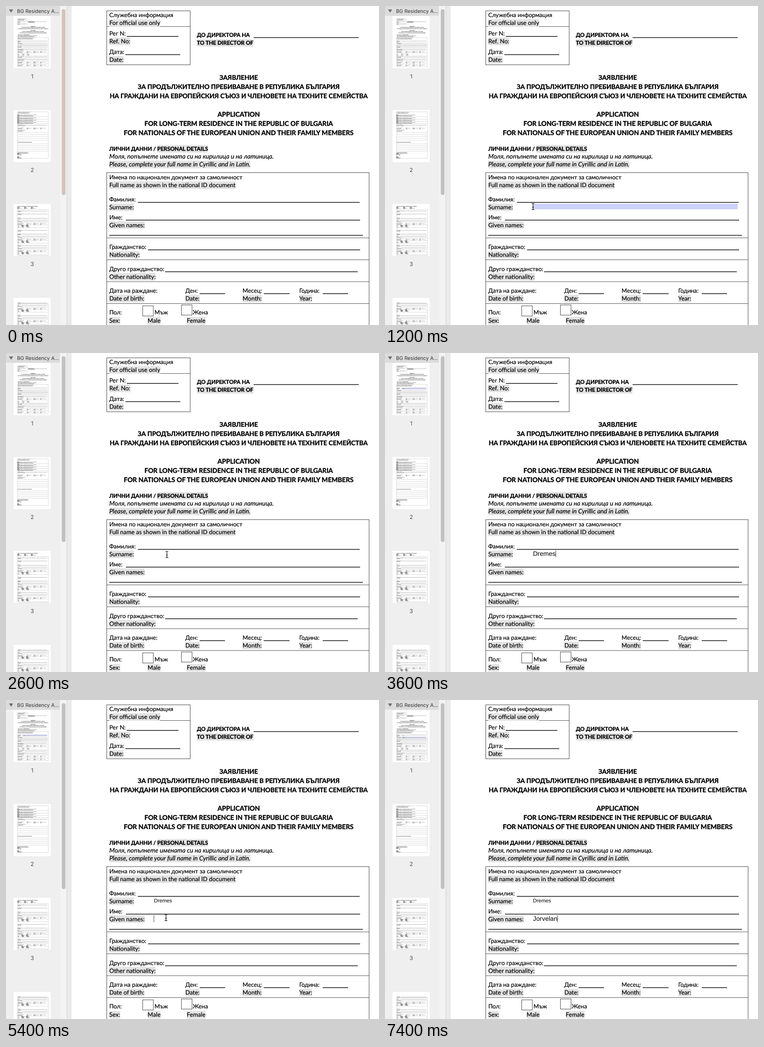
An HTML page that plays this animation: 809 by 692 pixels, repeating every 8000 ms.

```html
<!DOCTYPE html>
<html lang="bg">
<head>
<meta charset="utf-8">
<title>Application form</title>
<style>
html, body { margin: 0; width: 100%; height: 100%; overflow: hidden; background: #fff; }
svg { display: block; }
text { fill: #000; stroke: #000; stroke-width: .22px; font-family: Lato, "Open Sans", sans-serif; text-rendering: geometricPrecision; white-space: pre; }
text[font-weight="700"] { stroke-width: .4px; }
.ui { font-family: Inter, sans-serif; fill: #4a4a4a; stroke: none; }
.entry { font-family: "Liberation Sans", Arial, sans-serif; stroke: none; }
.blank { stroke-width: var(--blank); }
</style>
</head>
<body>
<svg id="stage" width="809" height="692" viewBox="0 0 809 692"></svg>
<script>
const LOOP = 8000, STEP = 200, THUMB = 0.1175;
const INK = '#111', RULE = '#555', MARK = '#e3e3e3', FIELD = '#ccd2fb';
const stage = document.getElementById('stage');

function el(parent, tag, attrs = {}, text) {
  const node = document.createElementNS('http://www.w3.org/2000/svg', tag);
  for (const key in attrs) node.setAttribute(key, attrs[key]);
  if (text !== undefined) node.textContent = text;
  parent.appendChild(node);
  return node;
}
const rect = (g, x, y, width, height, fill, more) =>
  el(g, 'rect', { x, y, width, height, fill, ...more });
const rule = (g, x1, x2, y) => el(g, 'path', { d: `M${x1} ${y}H${x2}`, stroke: RULE });
const blank = (g, x1, x2, y) => el(g, 'path', { d: `M${x1} ${y}H${x2}`, stroke: INK, class: 'blank' });
const frame = (g, x, y, w, h) => rect(g, x, y, w, h, 'none', { stroke: RULE });

// Type sizes: one per face and script
const pen = document.createElement('canvas').getContext('2d');
function sizeFor(face, sample, width) {
  pen.font = `${face} 100px Lato, "Open Sans", sans-serif`;
  return 100 * width / pen.measureText(sample).width;
}
const faces = {
  body: { weight: 400, style: 'normal',
    latin: sizeFor('400', 'Full name as shown in the national ID document', 274),
    cyr: sizeFor('400', 'Имена по национален документ за самоличност', 289) },
  bold: { weight: 700, style: 'normal',
    latin: sizeFor('700', 'TO THE DIRECTOR OF', 123),
    cyr: sizeFor('700', 'ДО ДИРЕКТОРА НА', 115) },
  head: { weight: 700, style: 'normal',
    latin: sizeFor('700', 'FOR NATIONALS OF THE EUROPEAN UNION AND THEIR FAMILY MEMBERS', 501),
    cyr: sizeFor('700', 'НА ГРАЖДАНИ НА ЕВРОПЕЙСКИЯ СЪЮЗ И ЧЛЕНОВЕТЕ НА ТЕХНИТЕ СЕМЕЙСТВА', 560) },
  slant: { weight: 400, style: 'italic',
    latin: sizeFor('italic 400', 'Please, complete your full name in Cyrillic and in Latin.', 307),
    cyr: sizeFor('italic 400', 'Моля, попълнете имената си на кирилица и на латиница.', 357) }
};

function write(g, x, y, text, face = 'body', anchor = 'start') {
  const f = faces[face];
  return el(g, 'text', { x, y, 'text-anchor': anchor, 'font-weight': f.weight, 'font-style': f.style,
    'font-size': /[А-я]/.test(text) ? f.cyr : f.latin }, text);
}
function marked(g, x, y, text, face) {
  const back = rect(g, x, y - 12.5, 0, 16.5, MARK);
  back.setAttribute('width', write(g, x, y, text, face).getComputedTextLength());
}
function pair(g, x, y, bg, en, gap = 17) {
  write(g, x, y, bg);
  marked(g, x, y + gap, en);
}
function dateRow(g, y) {
  pair(g, 224, y, 'Дата на раждане:', 'Date of birth:');
  pair(g, 389, y, 'Ден:', 'Date:');
  pair(g, 513, y, 'Месец:', 'Month:');
  pair(g, 636, y, 'Година:', 'Year:');
  [[420, 475], [559, 615], [687, 742]].forEach(([a, b]) => blank(g, a, b, y + 2));
}
function sexRow(g, y) {
  write(g, 224, y, 'Пол:');
  write(g, 322, y, 'Мъж');
  write(g, 405, y, 'Жена');
  marked(g, 224, y + 18, 'Sex:');
  marked(g, 307, y + 18, 'Male');
  marked(g, 392, y + 18, 'Female');
  frame(g, 296.5, y - 18.5, 23, 22);
  frame(g, 380.5, y - 20.5, 23, 22);
}
function lineRow(g, y, bg, en, from, to = 767) {
  pair(g, 224, y, bg, en);
  blank(g, from, to, y + 2);
}

// Page one
rect(stage, 0, 0, 809, 692, '#fff');
const view = el(stage, 'g', { 'stroke-width': 1.1, style: '--blank:1.5px' });
const fieldA = rect(view, 321, 429, 444, 12, FIELD);
const fieldB = rect(view, 321, 467, 442, 13, FIELD);
const doc = el(view, 'g', { id: 'doc' });

frame(doc, 218.5, 10.5, 181, 117);
rule(doc, 218, 400, 44.5);
pair(doc, 224, 24, 'Служебна информация', 'For official use only');
pair(doc, 224, 64, 'Рег N:', 'Ref. No:');
blank(doc, 262, 374, 66);
pair(doc, 224, 104, 'Дата:', 'Date:');
blank(doc, 259, 378, 105.5);
write(doc, 414, 67, 'ДО ДИРЕКТОРА НА', 'bold');
blank(doc, 537, 765, 68.5);
marked(doc, 414, 84, 'TO THE DIRECTOR OF', 'bold');

[[160, 'ЗАЯВЛЕНИЕ'],
 [180, 'ЗА ПРОДЪЛЖИТЕЛНО ПРЕБИВАВАНЕ В РЕПУБЛИКА БЪЛГАРИЯ'],
 [200, 'НА ГРАЖДАНИ НА ЕВРОПЕЙСКИЯ СЪЮЗ И ЧЛЕНОВЕТЕ НА ТЕХНИТЕ СЕМЕЙСТВА'],
 [239.5, 'APPLICATION'],
 [259.5, 'FOR LONG-TERM RESIDENCE IN THE REPUBLIC OF BULGARIA'],
 [279.5, 'FOR NATIONALS OF THE EUROPEAN UNION AND THEIR FAMILY MEMBERS']
].forEach(([y, text]) => write(doc, 504.7, y, text, 'head', 'middle'));

write(doc, 224, 314, 'ЛИЧНИ ДАННИ /', 'bold');
marked(doc, 328, 314, 'PERSONAL DETAILS', 'bold');
write(doc, 224, 331, 'Моля, попълнете имената си на кирилица и на латиница.', 'slant');
marked(doc, 224, 348, 'Please, complete your full name in Cyrillic and in Latin.', 'slant');

frame(doc, 218.5, 361.5, 569, 540);
[503, 550.5, 598, 645.5, 697, 745, 793, 845].forEach(y => rule(doc, 218, 788, y));
pair(doc, 224, 376, 'Имена по национален документ за самоличност',
  'Full name as shown in the national ID document');
lineRow(doc, 424, 'Фамилия:', 'Surname:', 286);
lineRow(doc, 462.5, 'Име:', 'Given names:', 260, 768);
blank(doc, 224, 774, 497.5);
lineRow(doc, 527, 'Гражданство:', 'Nationality:', 308, 768);
lineRow(doc, 574.5, 'Друго гражданство:', 'Other nationality:', 345, 763);
dateRow(doc, 622);
sexRow(doc, 669);
lineRow(doc, 718, 'Място на раждане:', 'Place of birth:', 345);
lineRow(doc, 766, 'Документ за самоличност:', 'Identity document:', 390);
dateRow(doc, 815);
dateRow(doc, 868);

const surname = el(doc, 'text', { class: 'entry', x: 321 });
const given = el(doc, 'text', { class: 'entry', x: 321, y: 479, 'font-size': 14 });
const caret = rect(stage, 0, 0, 1, 15, '#444');

// Sidebar
rect(stage, 0, 0, 141, 692, '#eaeaea');
rect(stage, 0, 0, 118, 692, '#efefef');
rect(stage, 118, 0, 13.5, 692, '#f3f3f3');
rect(stage, 131.5, 0, 1, 692, '#d2d2d2');
rect(stage, 141, 0, 0.7, 692, '#dcdcdc');
const bar = rect(stage, 121, 7, 8, 403, '#c1c1c1', { rx: 4 });

const sheets = [0, 1, 2, 3].map(i => {
  const top = 21.5 + i * 203.7;
  rect(stage, 16, top, 81.5, 114, '#fff', { stroke: '#e6e6e6', 'stroke-width': 0.5 });
  el(stage, 'text', { class: 'ui', x: 57, y: top + 135, 'font-size': 12, 'text-anchor': 'middle' }, i + 1);
  return el(stage, 'g', { transform: `translate(-.6 ${top + 4.5}) scale(${THUMB})`,
    'stroke-width': 1.8, style: '--blank:2.4px' });
});

const thumbA = rect(sheets[0], 321, 424, 444, 20, FIELD);
const thumbB = rect(sheets[0], 321, 462, 442, 20, FIELD);
el(sheets[0], 'use', { href: '#doc' });

const p2 = sheets[1];
const tick = (g, x, y) => rect(g, x, y, 24, 24, '#fff', { stroke: INK, 'stroke-width': 6 });
frame(p2, 218, -2, 570, 860);
pair(p2, 224, 15, 'Основание за пребиваване в страната', 'Ground for residence in the country');
[65, 112, 155, 195].forEach(y => {
  pair(p2, 256, y, 'Документ за упражнявана дейност или за обучение', 'Document for employment or for education');
  tick(p2, 220, y - 10);
  rule(p2, 218, 788, y + 24);
});
lineRow(p2, 245, 'Адрес в страната:', 'Address in the country:', 345);
dateRow(p2, 300);
pair(p2, 224, 345, 'Членове на семейството', 'Family members');
for (let i = 0; i < 5; i++) rule(p2, 218, 788, 380 + i * 35);
write(p2, 224, 560, 'ДРУГИ ОБСТОЯТЕЛСТВА ПО ЗАЯВЛЕНИЕТО', 'bold');
for (let i = 0; i < 5; i++) rule(p2, 218, 788, 590 + i * 34);
pair(p2, 224, 748, 'Прилагам следните документи', 'I enclose the following documents');
pair(p2, 256, 785, 'Копие', 'Copy');
tick(p2, 220, 765);
pair(p2, 256, 845, 'Друго', 'Other');
tick(p2, 220, 828);

function people(g, rows) {
  frame(g, 218, 70, 570, 850);
  for (const y of rows) {
    lineRow(g, y - 100, 'Фамилия:', 'Surname:', 286);
    lineRow(g, y - 52, 'Име:', 'Given names:', 300);
    dateRow(g, y);
    sexRow(g, y + 45);
    tick(g, 296, y + 27);
    tick(g, 380, y + 27);
    [-72, -24, 24, 70].forEach(d => rule(g, 218, 788, y + d));
  }
}
const p3 = sheets[2];
write(p3, 224, 12, 'ДАННИ ЗА ЧЛЕНОВЕТЕ НА СЕМЕЙСТВОТО / FAMILY MEMBERS', 'bold');
[220, 345, 470].forEach((x, i) => {
  tick(p3, x, 26);
  write(p3, x + 34, 44, ['Съпруг', 'Дете', 'Родител'][i]);
});
lineRow(p3, 95, 'Имена по документ:', 'Full name:', 345);
lineRow(p3, 150, 'Гражданство:', 'Nationality:', 308);
lineRow(p3, 452, 'Гражданство:', 'Nationality:', 308);
people(p3, [330, 620, 830]);
people(sheets[3], [160, 390]);

rect(stage, 0, 0, 117, 21, '#dcdcdc');
el(stage, 'path', { d: 'M6.5 7.5H15.5L11 14.5Z', fill: '#6c6c6c' });
el(stage, 'text', { class: 'ui', x: 24, y: 14.5, 'font-size': 10.8, style: 'fill:#333' }, 'BG Residency A...');

// Pointers
const arrow = el(stage, 'path', { d: 'M0 0V13.4L3 10.6 5 15.2 7.4 14.1 5.4 9.7H9.4Z',
  fill: '#000', stroke: '#fff', 'stroke-width': 0.8 });
const beam = el(stage, 'path', { d: 'M-3 -7Q0 -7 0 -5Q0 -7 3 -7M0 -5V5M-2 1.5H2M-3 7Q0 7 0 5Q0 7 3 7',
  fill: 'none', stroke: '#111', 'stroke-width': 1.2 });
const route = [[600, 430, 610], [1000, 321, 433], [1200, 321, 435], [1600, 321, 435], [2200, 349, 437],
  [4000, 349, 437], [4800, 310, 475], [5000, 322, 474], [5400, 347, 472], [LOOP, 347, 472]];

function along(t) {
  const i = Math.max(1, route.findIndex(p => p[0] >= t));
  const [a, b] = [route[i - 1], route[i]];
  const k = Math.min(1, Math.max(0, (t - a[0]) / (b[0] - a[0])));
  const ease = k * (2 - k);
  return [a[1] + (b[1] - a[1]) * ease, a[2] + (b[2] - a[2]) * ease];
}
const show = (node, on) => node.setAttribute('visibility', on ? 'visible' : 'hidden');
const within = (t, a, b) => t >= a && t < b;
function typed(word, t, start) {
  const k = Math.min(4, Math.max(0, (t - start) / STEP + 1)) / 4;
  return word.slice(0, Math.ceil(word.length * k));
}

function draw(now) {
  const t = Math.floor((now % LOOP) / STEP) * STEP;
  const done = t >= 4200;

  surname.textContent = typed('Dremes', t, 3000);
  surname.setAttribute('font-size', done ? 11.2 : 14);
  surname.setAttribute('y', done ? 439 : 440);
  given.textContent = typed('Jorvelan', t, 6800);

  show(fieldA, within(t, 1200, 1600));
  show(fieldB, within(t, 5000, 5200));
  show(thumbA, within(t, 3600, 6200));
  show(thumbB, t >= 6200);
  bar.setAttribute('fill', t < STEP ? '#d6c2b8' : '#c1c1c1');

  const entry = done ? given : surname;
  caret.setAttribute('x', 320.3 + (entry.textContent ? entry.getComputedTextLength() + 0.7 : 0));
  caret.setAttribute('y', done ? 467 : 428);
  show(caret, within(t, 1600, 2600) || within(t, 3000, 4200) || within(t, 5200, 5800) || t >= 6200);

  const place = `translate(${along(t)})`;
  const seen = within(t, 600, 3000) || within(t, 4000, 6800);
  const isArrow = t <= 1000 || within(t, 4200, 5000);
  arrow.setAttribute('transform', place);
  beam.setAttribute('transform', place);
  show(arrow, seen && isArrow);
  show(beam, seen && !isArrow);
}

let begin;
function tickFrame(now) {
  begin ??= now;
  draw(Math.max(0, now - begin));
  requestAnimationFrame(tickFrame);
}
draw(0);
requestAnimationFrame(tickFrame);
</script>
</body>
</html>
```
